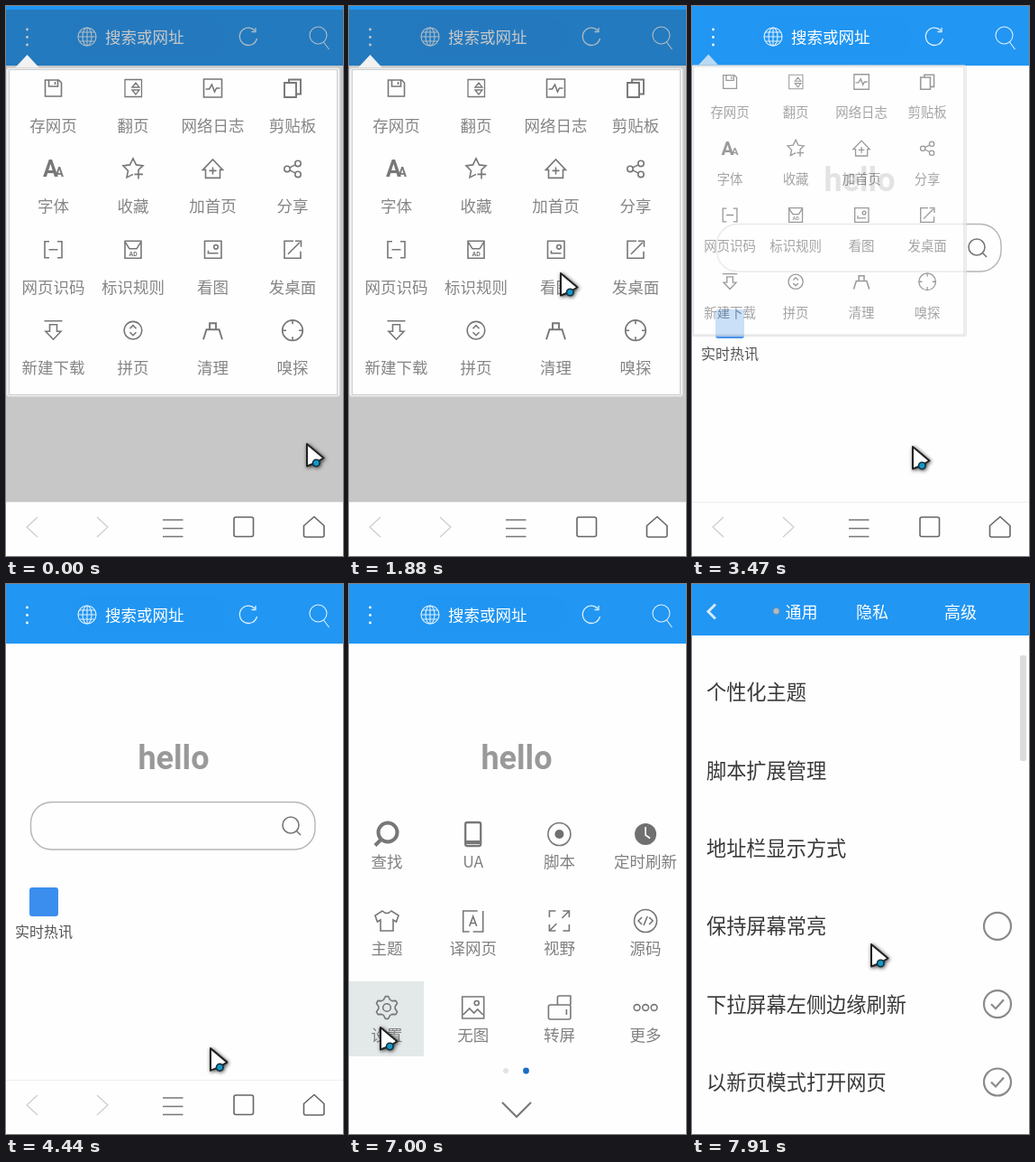
Animation of 374x609 px, one loop 8000 ms. Source, as an HTML page:

```html
<!DOCTYPE html>
<html lang="zh-CN">
<meta charset="utf-8">
<style>
html, body { margin: 0; width: 100%; height: 100%; overflow: hidden; background: #fefefe }
svg { display: block; font-family: "Noto Sans CJK SC", "Noto Sans CJK", "Noto Sans CJK JP", sans-serif }
.line { fill: none; stroke: #777; stroke-width: 1.6 }
.line text { fill: #777; stroke: none }
.solid { fill: #707070; stroke: none }
#cursor { filter: drop-shadow(1px 1px 2px rgba(0,0,0,.75)) }
</style>
<svg id="stage" width="374" height="609" viewBox="0 0 374 609"></svg>
<script>
const path = (d, attrs = '') => `<path d="${d}" ${attrs}/>`;
const circle = (x, y, r, attrs = '') => `<circle cx="${x}" cy="${y}" r="${r}" ${attrs}/>`;
const rect = (x, y, w, h, attrs = '') => `<rect x="${x}" y="${y}" width="${w}" height="${h}" ${attrs}/>`;
// CJK text centred vertically on y
const text = (s, x, y, size, fill, anchor = 'start') =>
  `<text x="${x}" y="${y + size * .38}" font-size="${size}" fill="${fill}" text-anchor="${anchor}">${s}</text>`;
const at = (x, y, body) => `<g transform="translate(${x} ${y})">${body}</g>`;
const line = body => `<g class="line">${body}</g>`;
const latin = (s, x, y, size) =>
  `<text x="${x}" y="${y}" font-size="${size}" font-family="Roboto, sans-serif" font-weight="700">${s}</text>`;

// four-column icon grid
const grid = (items, x0, dx, y0, dy, labelDrop, color) => items.map(([label, icon], i) => {
  const x = x0 + i % 4 * dx, y = y0 + (i >> 2) * dy;
  return at(x, y, line(icon)) + text(label, x, y + labelDrop, 17.5, color, 'middle');
}).join('');

const gear = 'M' + Array.from({ length: 24 }, (_, i) => {
  const a = (i - 1.5) * Math.PI / 12 - Math.PI / 2, r = i % 4 == 1 || i % 4 == 2 ? 12.5 : 9.3;
  return `${(r * Math.cos(a)).toFixed(1)} ${(r * Math.sin(a)).toFixed(1)}`;
}).join('L') + 'Z';

const popupItems = [
  ['存网页', path('M-9-9H6L9-6V9H-9ZM-5-9V-2H5V-9M2-7V-4')],
  ['翻页', path('M-9-9.5H9.5V9.5H-9ZM-1-1 3-6 7-1ZM-1 2 3 7 7 2Z', 'stroke-width="1.3"')],
  ['网络日志', path('M-10-10H10V10H-10ZM-8 1H-4L-1-4 2 4 4 0H8')],
  ['剪贴板', path('M-9-6H4V10H-9ZM-4-6V-9.5H9V6.5H4', 'stroke-width="1.9"')],
  ['字体', latin('A', -11.5, 9, 25) + latin('A', 2, 9, 14)],
  ['收藏', path('M5.5 1.5 11-3.5 3.5-4.5 0-11.5-3.5-4.5-11-3.5-5.5 2-7 9.5 0 6M1.5 6H11M6 1.5V11')],
  ['加首页', path('M-11 1 0-10.5 11 1H8V10H-8V1ZM-4 2H4M0-2V6')],
  ['分享', circle(-6, 0, 3.2) + circle(6, -6, 3.2) + circle(6, 6, 3.2) + path('M-3-1.5 3-4.5M-3 1.5 3 4.5')],
  ['网页识码', path('M-4.5-9H-9.5V9H-4.5M4.5-9H9.5V9H4.5M-5 0H5')],
  ['标识规则', path('M-9-9.5H9V9.5H-9ZM-9-9-4-1H4L9-9') + latin('AD', -4.5, 7, 7)],
  ['看图', path('M-9-9.5H9.5V9.5H-9ZM-6 4H6M-5 1V4') + circle(3.5, -3, 2.3)],
  ['发桌面', path('M1-9.5H-9V9.5H9V2M-5 5 8-8M3-9.5H9.5V-3')],
  ['新建下载', path('M-10-10.5H10M-4-6.5H4V1H8.5L0 10-8.5 1H-4Z')],
  ['拼页', circle(0, 0, 9.8) + path('M-3.5-2 0-5.5 3.5-2M-3.5 2 0 5.5 3.5 2')],
  ['清理', path('M-3.5-1V-8H3.5V-1M-10.5 10-7-1H7L10.5 10', 'stroke-width="1.9"')],
  ['嗅探', circle(0, 0, 11.3) + path('M0-11V-7M0 11V7M-11 0H-7M11 0H7')]
];

const sheetItems = [
  ['查找', circle(1, -2, 10.5, 'stroke-width="4"') + path('M-6.5 6-13 12.5', 'stroke-width="4"')],
  ['UA', rect(-8.5, -13, 17, 26, 'rx="2" stroke-width="2.3"') + path('M-8 9H8', 'stroke-width="4"')],
  ['脚本', circle(0, 0, 12.5) + circle(0, 0, 5, 'class="solid"')],
  ['定时刷新', circle(0, 0, 12, 'class="solid"') + path('M0-8V1L5 4.5', 'stroke="#fff"')],
  ['主题', path('M-5-11Q0-6 5-11L13-6 10.5 1 7-1V11H-7V-1L-10.5 1-13-6Z')],
  ['译网页', path('M5-11H-11V12H-4M11-11V12H0M-4 6 0-5 4 6M-2.5 2.5H2.5')],
  ['视野', path('M-11-4V-11H-4M4-11H11V-4M11 4V11H4M-4 11H-11V4M11-11 3-3M-11 11-3 3')],
  ['源码', circle(0, 0, 12.5) + path('M-4-4-8 0-4 4M4-4 8 0 4 4M2-5-2 5')],
  ['设置', path(gear, 'stroke-linejoin="round"') + circle(0, 0, 4.3)],
  ['无图', path('M-12-12H12V12H-12ZM-11 8-4 1 1 6 5 2 11 8') + circle(4, -5, 2.5)],
  ['转屏', rect(-12, -3, 24.5, 16, 'rx="2"') + path('M-2-3V-11Q-2-13 0-13H12.5V-3M8 2V8')],
  ['更多', [-9.5, 0, 9.5].map(x => circle(x, 0, 3.4)).join('')]
];

const header = rect(0, 0, 374, 66, 'fill="#2196f3"') + rect(74, 13, 168, 41, 'rx="18" fill="#1d90ef" opacity=".25"') +
  [26, 34.5, 43].map(y => circle(23.5, y, 1.4, 'fill="#fff"')).join('') +
  `<g fill="none" stroke="#fff" stroke-width="1.1" opacity=".85">` +
  at(90, 34, circle(0, 0, 10) + '<ellipse rx="5" ry="10"/>' + path('M0-10V10M-10 0H10M-8.5-5H8.5M-8.5 5H8.5')) +
  at(269, 34, path('M9.5 2A9.7 9.7 0 1 1 7-7M8-10V-5.5H3.5', 'stroke-width="1.3"')) +
  at(346.5, 32.5, circle(0, 0, 9.5) + path('M6 7.5 12 15.5')) + '</g>' +
  text('搜索或网址', 110, 34.5, 17.5, '#fff');

const home = `<text x="186" y="204.5" text-anchor="middle" font-family="Roboto, sans-serif" font-weight="700" font-size="36" fill="#999">hello</text>` +
  rect(27.5, 241.5, 315.5, 52.5, 'rx="23" fill="none" stroke="#b5b5b5" stroke-width="1.4"') +
  at(316, 267, line(circle(0, 0, 9) + path('M6.5 6.5 11 11'))) +
  rect(26, 336, 32, 32, 'rx="3" fill="#3b8eed"') + text('实时热讯', 10, 385, 16, '#555');

const toolbar = rect(0, 549, 374, 60, 'fill="#fefefe"') + rect(0, 549, 374, 1, 'fill="#eee"') +
  line(path('M35 566 23 577 35 588', 'style="stroke:#ccc;stroke-width:1.2"') +
    path('M101 566 113 577 101 588', 'style="stroke:#ccc;stroke-width:1.2"') +
    path('M174 569H196.5M174 578.5H196.5M174 587.5H196.5') +
    rect(253, 566, 21.5, 21.5, 'rx="2" style="stroke:#666"') +
    path('M330.5 575.5 342 565.5 353 575.5V586Q353 588 351 588H332.5Q330.5 588 330.5 586Z', 'style="stroke:#666"'));

const popup = path('M10 68.5 23.5 54 37 68.5Z', 'fill="#f2f2f2"') +
  rect(.5, 68.5, 370, 364, 'rx="3" fill="#f0f0f0" stroke="#d8d8d8"') +
  rect(3.5, 70.5, 364, 360, 'fill="#fefefe" stroke="#ccc"') +
  grid(popupItems, 52.5, 88.5, 91, 89.4, 41.2, '#858585');

const sheet = rect(0, 240, 374, 369, 'fill="#fefefe"') + rect(0, 440, 83, 83, 'id="pressed" fill="#e3e8e8"') +
  grid(sheetItems, 42, 95.7, 277, 96, 30.7, '#808080') +
  circle(174, 539, 3, 'fill="#e3e3e3"') + circle(196.5, 539, 3.4, 'fill="#1a6cc4"') +
  line(path('M170 574 186 590 202 574', 'stroke-width="2"'));

const rows = ['个性化主题', '脚本扩展管理', '地址栏显示方式', '保持屏幕常亮', '下拉屏幕左侧边缘刷新', '以新页模式打开网页'];
const settings = rect(0, 0, 374, 609, 'fill="#fefefe"') + rect(0, 0, 374, 57, 'fill="#2196f3"') +
  path('M26 22.5 18 30.5 26 38.5', 'fill="none" stroke="#d5eafc" stroke-width="3"') +
  circle(93.5, 30, 3.6, 'fill="#b5bcc2" stroke="#6b8fae"') +
  text('通用', 103.5, 31, 18, '#fff') + text('隐私', 182, 31, 18, '#fff') + text('高级', 280, 31, 18, '#fff') +
  rows.map((label, i) => {
    const y = 120 + i * 86.3;
    const box = circle(0, 0, 15) + (i > 3 ? path('M-7 0-2 5 7-5') : '');
    return text(label, 16, y, 22.2, '#383838') +
      (i > 2 ? at(339, y, `<g fill="none" stroke="#8a8a8a" stroke-width="2.2">${box}</g>`) : '');
  }).join('') +
  rect(364, 79, 7, 117, 'rx="2" fill="#dcdcdc"');

const cursor = path('M0 0V24.5L9 21 18.5 15.5Z', 'fill="#fff" stroke="#222" stroke-width="2" stroke-linejoin="round"') +
  circle(10.3, 21, 3.8, 'fill="#1599c9" stroke="#12303f" stroke-width="1.6"');

const dim = rect(0, 4, 374, 545, 'fill="#303030" opacity=".266"');
const layers = { header, home, dim, toolbar, popup, sheet, settings, black: rect(0, 0, 374, 609), cursor };
stage.innerHTML = rect(0, 0, 374, 609, 'fill="#fefefe"') +
  Object.entries(layers).map(([id, body]) => `<g id="${id}">${body}</g>`).join('');
const el = id => document.getElementById(id);
const show = (id, on) => el(id).style.display = on ? '' : 'none';
const clamp = v => Math.min(1, Math.max(0, v));

// bursts of screen updates: first, last, count
const bursts = [[430, 1340, 7], [1490, 1880, 4], [2380, 3190, 7], [3470, 4010, 5], [4290, 5230, 7],
  [5350, 5350, 1], [5650, 5890, 3], [6160, 7000, 7], [7150, 7910, 7]];
function lastUpdate(t) {
  let held = 0;
  for (const [a, b, n] of bursts) {
    if (t < a) break;
    const step = (b - a) / (n - 1) || 1;
    held = Math.min(b, a + Math.floor((t - a) / step + 1e-6) * step);
  }
  return held;
}

// pointer stops: time, x, y
const stops = [[300, 334, 485], [1340, 271, 324], [1880, 235, 296], [2250, 235, 296], [2780, 224, 400], [3190, 245, 488],
  [4150, 245, 488], [4600, 187, 572], [4760, 187, 572], [5230, 206, 455], [5350, 206, 454], [5530, 206, 454],
  [5650, 206, 442], [5890, 204, 432], [6020, 204, 432], [6860, 35, 491], [7270, 35, 491], [7910, 199, 399]];
function pointer(t) {
  const i = stops.findIndex(s => s[0] > t);
  if (i < 1) return (i ? stops.at(-1) : stops[0]).slice(1);
  const [a, b] = [stops[i - 1], stops[i]], p = (t - a[0]) / (b[0] - a[0]);
  return [1, 2].map(k => a[k] + (b[k] - a[k]) * p);
}

function draw(now) {
  const t = lastUpdate(now % 8000);
  el('cursor').setAttribute('transform', `translate(${pointer(t)})`);

  const closing = t < 3470 ? 0 : clamp((t - 3290) / 540), scale = 1 - .525 * closing;
  show('dim', t < 3470);
  show('popup', closing < 1);
  el('popup').setAttribute('transform', `translate(${-7 * (1 - scale)} ${51 * (1 - scale)}) scale(${scale})`);
  el('popup').setAttribute('opacity', 1 - closing ** 1.2);

  const rise = clamp((t - 4680) / 360);
  show('sheet', rise > 0);
  el('sheet').setAttribute('transform', `translate(0 ${368 * (1 - rise) ** 2})`);
  show('pressed', t > 6850);
  show('black', t >= 7150 && t < 7270);
  show('settings', t >= 7270);
}
function loop() {
  draw(performance.now());
  requestAnimationFrame(loop);
}
loop();
</script>
</html>
```
